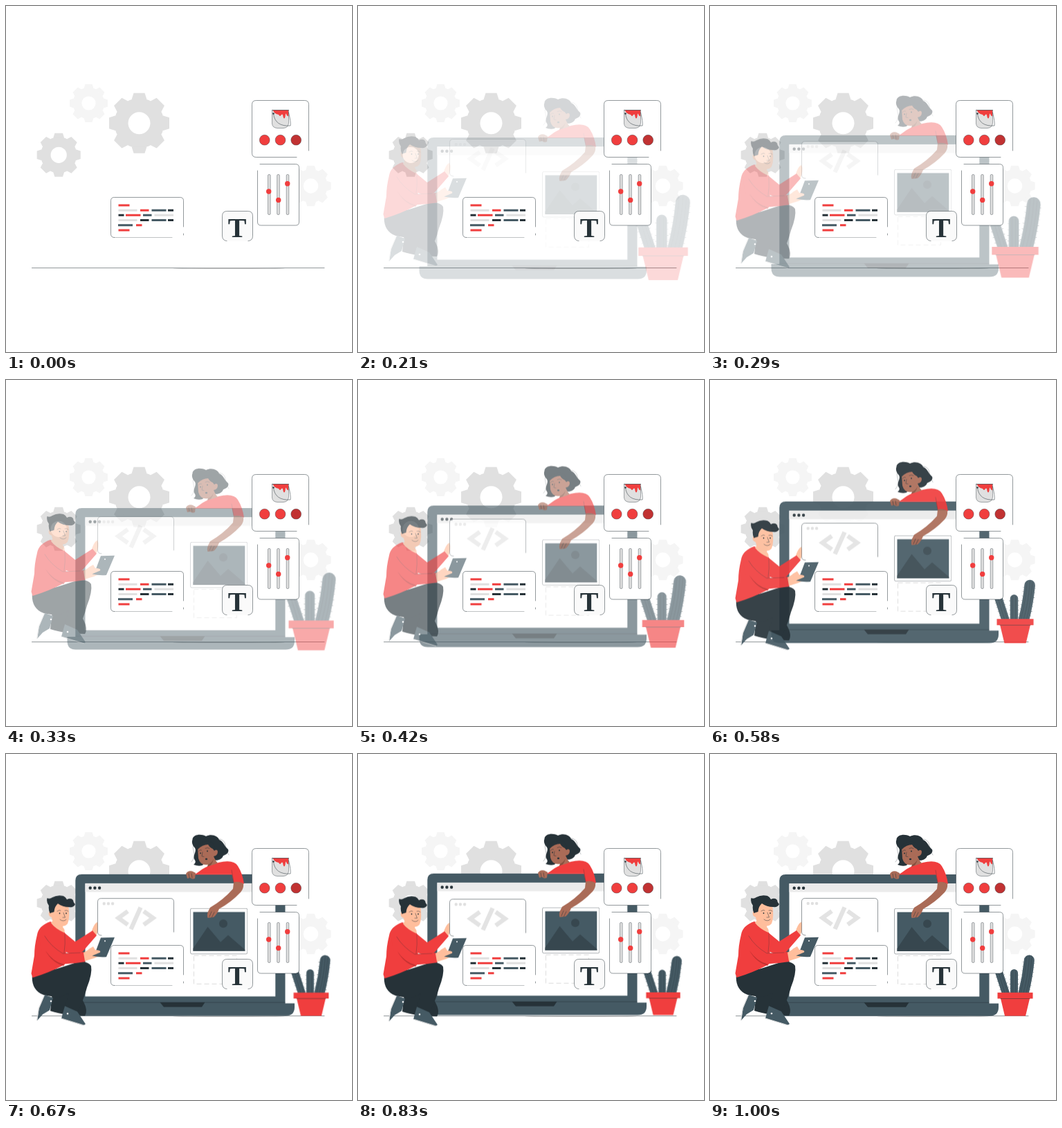
These frames come from a looping animation (500x500 px, 1.04 s). An HTML page:

```html
<!DOCTYPE html>
<html lang="en">
<head>
<meta charset="utf-8">
<title>Web design workspace</title>
<style>
  html, body { margin: 0; width: 100%; height: 100%; overflow: hidden; background: #fff; }
  svg { display: block; width: 100%; height: 100%; }

  /* Paused: the script below steps these at 24 frames per second. */
  .up, .down, .zoom { animation: 1s cubic-bezier(.36, -.01, .5, 1.38) both paused; }
  .up { animation-name: up; }
  .down { animation-name: down; }
  .zoom { animation-name: zoom; transform-origin: 441px 334.5px; }
  @keyframes up { from { opacity: 0; transform: translateY(20px); } to { opacity: 1; transform: none; } }
  @keyframes down { from { opacity: 0; transform: translateY(-20px); } to { opacity: 1; transform: none; } }
  @keyframes zoom { from { opacity: 0; transform: scale(1.5); } to { opacity: 1; transform: none; } }

  .red { fill: #f03e3e; }
  .crimson { fill: #c13232; }
  .slate { fill: #455a64; }
  .dark { fill: #263238; }
  .grey { fill: #e0e0e0; }
  .pale { fill: #f5f5f5; }
  .white { fill: #fff; }
  .skin { fill: #ffbe9c; }
  .brown { fill: #aa6b57; }
  .edge { stroke: #263238; stroke-width: .4; }
  .line { fill: none; stroke: #263238; stroke-width: .5; stroke-linecap: round; stroke-linejoin: round; }
  .thin { stroke-width: .3; }
  .bars { fill: none; stroke-width: 3; }
</style>
</head>
<body>
<svg viewBox="0 0 500 500">
  <defs>
    <path id="teeth" d="M-11-34L-8-43.5H8L11-34ZM-11 34L-8 43.5H8L11 34Z"/>
    <g id="gear">
      <path d="M0-36A36 36 0 0 1 0 36A36 36 0 0 1 0-36ZM0-16A16 16 0 0 0 0 16A16 16 0 0 0 0-16Z"/>
      <use href="#teeth"/>
      <use href="#teeth" transform="rotate(45)"/>
      <use href="#teeth" transform="rotate(90)"/>
      <use href="#teeth" transform="rotate(135)"/>
    </g>
  </defs>

  <!-- Backdrop -->
  <use href="#gear" class="grey" transform="translate(192.5 169.2)"/>
  <use href="#gear" class="grey" transform="translate(76.2 215.3) scale(.725)"/>
  <use href="#gear" class="pale" transform="translate(119.5 140.5) scale(.63)"/>
  <use href="#gear" class="pale" transform="translate(440.5 260) scale(.67)"/>
  <path class="line" d="M37.5 378.5H460"/>
  <ellipse cx="322" cy="379.2" rx="81" ry=".8" fill="#bbb"/>

  <!-- Laptop -->
  <g class="up">
    <path class="slate" d="M100.3 360V183Q100.3 174 109.500 174H394Q403.500 174 403.500 183V360.500H417V366Q417 378.500 404 378.500H101Q88.500 378.500 88.500 366V360Z"/>
    <path class="white" d="M114.5 187.300H389.300V350.500H114.5Z"/>
    <path fill="#ebebeb" d="M114.5 187.300H389.300V199.500H114.5Z"/>
    <g class="dark">
      <circle cx="121.7" cy="193.7" r="2.2"/>
      <circle cx="128.4" cy="193.7" r="2.2"/>
      <circle cx="135.1" cy="193.7" r="2.2"/>
      <path d="M222.5 359H287.500L283 365.800H228Z"/>
    </g>
    <path class="line" d="M101 359.200H403"/>
    <rect x="271.500" y="291.500" width="62" height="41" fill="none" stroke="#d5d5d5" stroke-width=".8" stroke-dasharray="7 4"/>
  </g>

  <!-- Picture panel -->
  <g class="up">
    <rect class="white edge" x="266.500" y="223.300" width="82.300" height="65.700" rx="2"/>
    <path class="slate" d="M270.500 228.500H345.300V285H270.500Z"/>
    <path fill="#37474f" d="M270.500 281L291.500 250L310 272L321 262L345.300 283V285H270.500Z"/>
    <circle cx="314" cy="245.300" r="6" fill="#37474f"/>
  </g>

  <!-- Woman -->
  <g class="up">
    <path class="line thin" d="M276 121Q268 130 271 140T268 156M308 123Q316 124 317 132T322 146"/>
    <path class="dark" d="M269.500 123C271 116 282 115 289 119C298 115 306 119 308 124C315 127 315 133 321 138C323 143 317 146 314 147C312 153 305 155 299 153L288 156L284 161Q278 163 271 160Q276 157 272 152C270 146 276 141 273 136C269 132 268 127 269.500 124Z"/>
    <path class="brown" d="M277 135Q284 129 294 131L301 140Q305 137 306 141Q306 147 300 148Q302 154 307 159L298 166L289 168L292 160Q281 162 278 151Z"/>
    <path fill="#84503f" d="M292 160Q297 158 300 152Q298 161 291 164Z"/>
    <path class="dark" d="M276 133Q285 124 298 128L303 138Q296 138 292 131Q284 131 277 138Z"/>
    <path class="line" d="M278.500 140.500Q280 138 282.500 139M288 136.500Q291 134.500 294 136.500M284 142L283 148L286 148.500"/>
    <ellipse class="dark" cx="289.500" cy="152" rx="1.700" ry="1.200"/>
    <circle class="dark" cx="281" cy="143.500" r="1"/>
    <circle class="dark" cx="291" cy="140.500" r="1"/>
    <path class="red" d="M272 174.500C279 171 284 165 293 162Q302 160 307 157Q329 152 335 162Q342 173 344 188Q335 183 329 186L326.500 174.500Z"/>
    <path class="line thin" d="M326 168L329 185"/>
    <path class="brown" d="M329 186Q335 183 343 187.500Q344 194 339 200Q326 214 308 224Q305 232 300 236L291.500 237Q289 232 295 222Q314 211 328 195Z"/>
    <path class="brown" d="M260 173Q263 168 269 169.500L274 172L273 180Q269 182 266 179L262 180Z"/>
    <path class="line" d="M294 235L297 228M297.500 236L301 229M264 173L265 179M268 173L269 179"/>
  </g>

  <!-- Man -->
  <g class="down">
    <path class="skin" d="M123 259Q126 246 132 242.500L133.500 247Q134 258 128 265Z"/>
    <path class="red" d="M83 257L100 271L125 255L131 262L111 285Q104 291 94 289L80 283Z"/>
    <path class="dark" d="M67 344L94 340L111 356Q119 370 114 378L90 377Q73 374 64 371Z"/>
    <path class="dark" d="M38 318Q36 338 50 346Q58 351 80 350L91 345L84 367L102 374Q112 357 117 337Q125 317 123 306Q118 298 102 301L74 310Z"/>
    <path class="slate" d="M56 348L68 352L63 370L53 376L45 385L48 366Z"/>
    <path class="slate" d="M85 364L103 372L115 390L112 392L80 382Z"/>
    <path fill="none" stroke="#e0e0e0" stroke-width="1.300" d="M55 349L47 368L44.500 385M80 382L113 392"/>
    <circle class="white" cx="65" cy="357" r="1.300"/>
    <circle class="white" cx="89" cy="375" r="1.300"/>
    <path class="red" d="M64 242Q47 248 45 261Q41 277 41 291L36.500 317L38.500 323Q62 316 85 304Q88 280 87 262L80 249Z"/>
    <path class="red" d="M48 264Q56 262 67 278L82 288L113 286L114.500 300Q98 303 81 303.500Q65 300 51 282Z"/>
    <path class="crimson" d="M57 284Q68 300 83 303.500L84 306Q67 302 57 284Z"/>
    <path class="line thin" d="M56 263Q65 278 82 288L107 287M85 260Q86 274 84 287"/>
    <path class="skin" d="M68 240L84 240L82 250Q86 254 84 258Q71 252 65 244Z"/>
    <path class="skin" d="M66 220Q78 212 90 218Q93 235 89 245Q84 251 75 247Q67 244 66 236Q60 233 62 228Q64 225 67 228Z"/>
    <path class="dark" d="M63.500 230Q61 224 62 219Q58 214 59.500 208Q63 210 67 207Q74 203 83 205Q87 207 88 210Q94 207 97 211Q97 214 100 217Q98 222 91 221Q82 221 75 216Q70 220 69.500 228L66 229Z"/>
    <path class="line" d="M74 227Q77 224.500 79 226M85 226Q88 225 90 227M83 229L85.500 236L82 236M78 239Q83 243 87 239"/>
    <circle class="dark" cx="77.500" cy="230" r=".9"/>
    <circle class="dark" cx="87" cy="230" r=".9"/>
    <path class="skin" d="M112 287L120 282L130 283Q138 284 133 288L136 291L127 295L114 299Z"/>
    <path class="slate" d="M137 265.300L157 264.800L145 293Q135 294 124.500 291.500L130 284Z"/>
    <path class="skin" d="M119 282L126 278L129 283Q138 283 136 286.500L123 292Z"/>
    <circle class="white" cx="143" cy="270" r="1"/>
  </g>

  <!-- Code window -->
  <g class="down">
    <rect class="white" x="132.500" y="208.500" width="110" height="53.500" rx="5"/>
    <path class="line" d="M242.500 257V213.500Q242.500 208.500 237.500 208.500H137.500Q132.500 208.500 132.500 213.500V257Q132.500 262 138 262"/>
    <g class="grey">
      <circle cx="141.700" cy="216" r="2.200"/>
      <circle cx="147.900" cy="216" r="2.200"/>
      <circle cx="154.100" cy="216" r="2.200"/>
    </g>
    <path fill="none" stroke="#e3e3e3" stroke-width="6.300" d="M176 227L162.500 236.700L176 246.500M194.500 221.500L180.500 253M199 227L212.500 236.700L199 246.500"/>
  </g>

  <!-- Cactus pot -->
  <g class="zoom">
    <g fill="none" stroke="#263238" stroke-dasharray=".3 6">
      <path d="M427 345L417 313M439.500 345V315" stroke-width="14"/>
      <path d="M453 345Q459 322 461 296" stroke-width="18"/>
    </g>
    <g fill="none" stroke="#455a64" stroke-width="11" stroke-linecap="round">
      <path d="M427.500 346L416.500 312M439.500 346V316.500"/>
      <path d="M453 346Q459 322 461.300 298" stroke-width="15"/>
    </g>
    <path class="line thin" d="M426 345L415 309M430 345L419 311M437.500 345V313M441.500 345V313M449 345Q456 318 457.500 293M453 345Q460 320 461.500 292M457 345Q463 322 465 294"/>
    <path class="red" d="M415.500 344.800H466.500V353.500H462L456 378.500H426L420 353.500H415.500Z"/>
    <path class="line" d="M420 353.500H462"/>
  </g>

  <!-- Code card -->
  <rect class="white" x="151.500" y="276.500" width="105" height="58" rx="5"/>
  <path class="line" d="M256.500 319V281.500Q256.500 276.500 251.500 276.500H156.500Q151.500 276.500 151.500 281.500V329.500Q151.500 334.500 156.500 334.500M256.500 329V331"/>
  <path class="line thin" d="M156.500 334.500H240"/>
  <g class="bars">
    <path stroke="#f03e3e" d="M162.500 288H178.500M194 295.200H206.500M173 302.300H194.500M188 316.700H196.500M162.500 324H178.500"/>
    <path stroke="#e0e0e0" d="M162.500 295.200H189.500M214.500 302.300H242M162.500 309.500H189.500"/>
    <path stroke="#455a64" d="M210.500 295.200H231.500M198 302.300H210.500M210.500 309.500H231.500M162 316.700H183"/>
    <path stroke="#263238" d="M234 295.200H242M162.500 302.300H170.500M194 309.500H206.500M234 309.500H242"/>
  </g>

  <!-- Type card -->
  <rect x="312.500" y="296.500" width="44" height="43" rx="7" fill="#fafafa"/>
  <path class="line" d="M319 339.500Q312.500 339 312.500 332V303.500Q312.500 296.500 319.500 296.500H349.500Q356.500 296.500 356.500 303.500V332.500Q356.500 339 350 339.500"/>
  <text class="dark" x="334.200" y="333.500" text-anchor="middle" font-family="'Liberation Serif', serif" font-weight="700" font-size="40">T</text>

  <!-- Sliders card -->
  <rect class="white" x="363.500" y="228.500" width="60" height="88.500" rx="5"/>
  <path class="line" d="M363.500 238V312Q363.500 317 368.500 317H418.500Q423.500 317 423.500 312V233.500Q423.500 228.500 418.500 228.500H367"/>
  <g class="grey edge">
    <rect x="378.500" y="243.500" width="3.600" height="58" rx="1.500"/>
    <rect x="391.700" y="243.500" width="3.600" height="58" rx="1.500"/>
    <rect x="405.200" y="243.500" width="3.600" height="58" rx="1.500"/>
  </g>
  <g class="red">
    <circle cx="379.700" cy="268" r="3.700"/>
    <circle cx="393.700" cy="280.500" r="3.700"/>
    <circle cx="406.700" cy="256.700" r="3.700"/>
  </g>

  <!-- Paint card -->
  <rect class="white" x="355.500" y="136.500" width="82" height="82" rx="6"/>
  <path class="line" d="M437.500 209V142.500Q437.500 136.500 431.500 136.500H361.500Q355.500 136.500 355.500 142.500V212.500Q355.500 218.500 361.500 218.500H420"/>
  <path class="grey edge" d="M384.500 150.500H408.500V169Q408 176 401 176.500H392Q385 176 384.500 170Z"/>
  <path class="red" d="M385.500 150.500H408V159Q406 160 405 156Q404 154 403.500 160Q402 165 400.500 160Q400 155 398 157Q396 161 394 157Q388 156 385.500 150.500Z"/>
  <path class="line" d="M384.500 150.500H408.500M386.500 156C388 168 396 174 411 173Q412 168 408.500 154"/>
  <circle class="dark" cx="386.500" cy="155.500" r="1.200"/>
  <g class="edge">
    <circle class="red" cx="373.700" cy="193.700" r="7.400"/>
    <circle class="red" cx="396.500" cy="193.700" r="7.400"/>
    <circle class="crimson" cx="419.200" cy="193.700" r="7.400"/>
  </g>
</svg>
<script>
  const LOOP = 1040, STEP = 1000 / 24;
  const motions = document.getAnimations();
  const start = performance.now();

  function draw() {
    const time = (performance.now() - start) % LOOP;
    // Frame times are rounded to 10 ms, and the blank stage holds for two steps.
    const step = Math.floor((time + 4) / STEP);
    const pose = step < 2 ? 0 : (step + .6) * STEP;
    for (const motion of motions) motion.currentTime = pose;
    requestAnimationFrame(draw);
  }
  draw();
</script>
</body>
</html>
```
